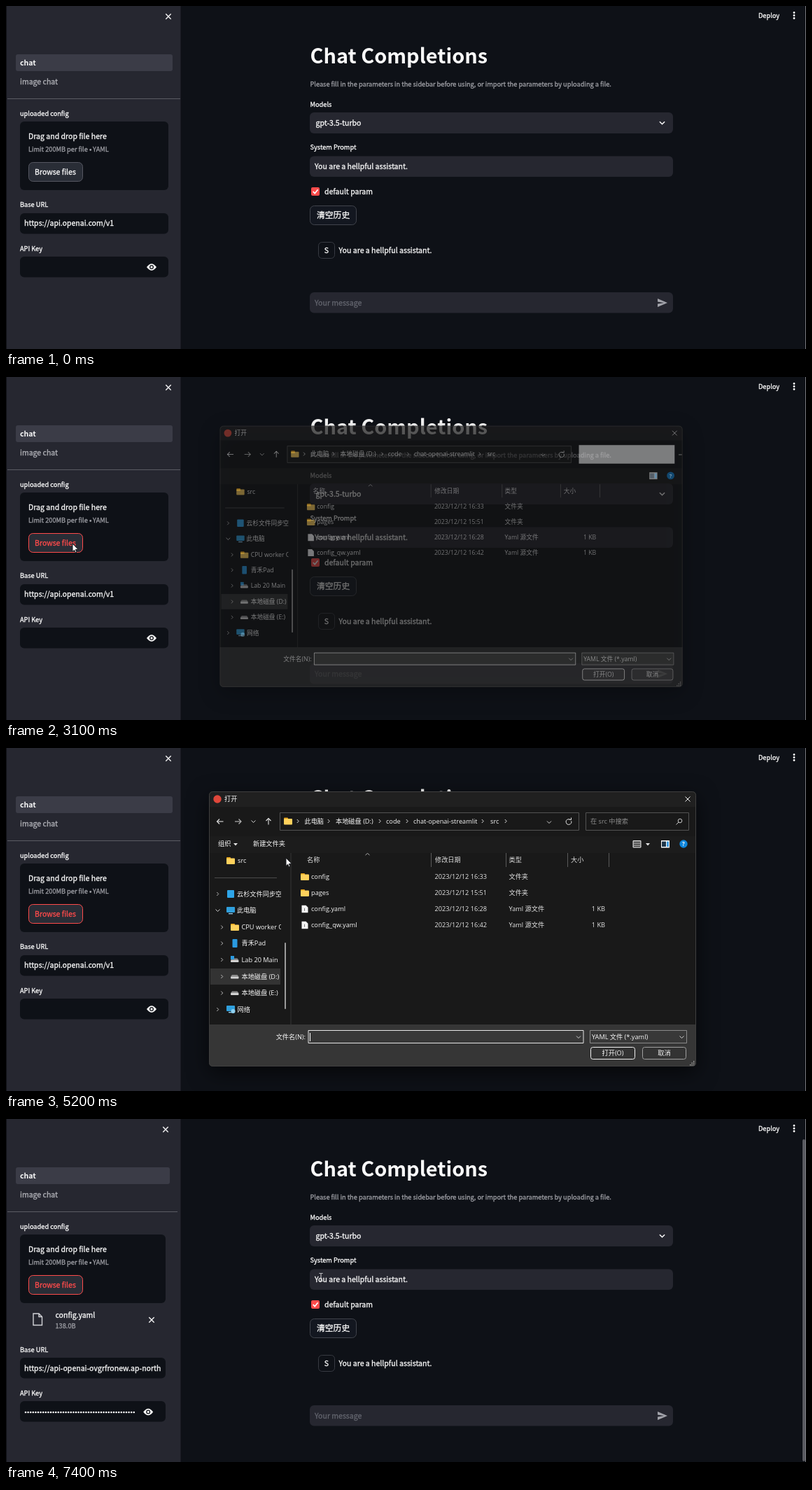
Recreate the animation shown at these times as an HTML page with a canvas. Size 1143 by 490 pixels, loop 8 s.

```html
<!DOCTYPE html>
<html lang="en">
<head>
<meta charset="utf-8">
<title>Chat Completions</title>
<style>
  html, body { margin: 0; width: 100%; height: 100%; overflow: hidden; background: #0e1117; }
  canvas { display: block; }
</style>
</head>
<body>
<canvas id="stage" width="1143" height="490"></canvas>
<script>
const ctx = document.getElementById('stage').getContext('2d');
const LOOP = 8000, STEP = 100;
const WEB = '"Noto Sans CJK SC", "Noto Sans CJK", sans-serif';
const UI = '"Open Sans", "Noto Sans CJK SC", "Noto Sans CJK", sans-serif';
const BODY = 10.54, SMALL = 9.22, DIALOG = 9.2;
const DARK = '#0e1117', PANEL = '#262730', WHITE = '#fafafa', RED = '#ff4b4b', FADED = '#9d9ea4';

// ---- drawing helpers ----
function label(str, x, y, { size = BODY, color = WHITE, font = WEB, weight = 400, align = 'left' } = {}) {
  const baseline = Math.round(y + size * 0.36);
  ctx.font = `${weight} ${size}px ${font}`;
  ctx.fillStyle = ctx.strokeStyle = color;
  ctx.textAlign = align;
  ctx.fillText(str, x, baseline);
  if (font === WEB && weight === 400) { // slightly heavier regular weight
    ctx.lineWidth = 0.3;
    ctx.strokeText(str, x, baseline);
  }
}
const small = (str, x, y, color = WHITE) => label(str, x, y, { size: SMALL, color });
const ui = (str, x, y, color = '#f8f8f8', align = 'left') =>
  label(str, x, y, { size: DIALOG, font: UI, color, align });

function box(x, y, w, h, r, fill, stroke) {
  const inset = stroke ? 0.5 : 0;
  ctx.beginPath();
  ctx.roundRect(x + inset, y + inset, w - 2 * inset, h - 2 * inset, r);
  if (fill) { ctx.fillStyle = fill; ctx.fill(); }
  if (stroke) { ctx.strokeStyle = stroke; ctx.lineWidth = 1; ctx.stroke(); }
}
function disc(x, y, r, color) {
  ctx.beginPath();
  ctx.arc(x, y, r, 0, Math.PI * 2);
  ctx.fillStyle = color;
  ctx.fill();
}
function line(color, width, ...points) {
  ctx.beginPath();
  for (let i = 0; i < points.length; i += 2) ctx.lineTo(points[i], points[i + 1]);
  ctx.strokeStyle = color;
  ctx.lineWidth = width;
  ctx.stroke();
}
function shape(x, y, path, fill, stroke, width = 1) {
  const p = new Path2D(path);
  ctx.save();
  ctx.translate(x, y);
  if (fill) { ctx.fillStyle = fill; ctx.fill(p); }
  if (stroke) { ctx.strokeStyle = stroke; ctx.lineWidth = width; ctx.stroke(p); }
  ctx.restore();
}
function clipped(x, y, w, h, draw) {
  ctx.save();
  ctx.beginPath();
  ctx.rect(x, y, w, h);
  ctx.clip();
  draw();
  ctx.restore();
}
function cross(x, y, s, color = WHITE, width = 1.3) {
  line(color, width, x - s, y - s, x + s, y + s);
  line(color, width, x - s, y + s, x + s, y - s);
}
const down = (x, y, s = 3, color = '#d0d0d0', w = 1) => line(color, w, x - s, y - s / 2, x, y + s / 2, x + s, y - s / 2);
const right = (x, y, s = 2.5, color = '#b8b8b8') => line(color, 1, x - s / 2, y - s, x + s / 2, y, x - s / 2, y + s);

function folder(x, y) {
  box(x, y - 5, 6, 4, 1, '#e8a317');
  box(x, y - 3.5, 12, 8.5, 1, '#ffd15c');
}
function eye(x, y) {
  shape(x, y, 'M-7 0Q0 -9.5 7 0Q0 9.5 -7 0Z', WHITE);
  disc(x, y, 3, DARK);
  disc(x, y, 1.7, WHITE);
}

// ---- web page ----
function sidebar(time) {
  const loaded = time >= 6500;
  const trim = loaded ? 4 : 0;
  const drop = loaded ? 45.5 : 0;
  const edge = 232 - trim;

  box(1, 0, 248.5, 490, 0, PANEL);
  cross(edge, 15, 3.7);
  box(14, 69, 224 - trim, 24, 3, '#3b3c47');
  label('chat', 20, 81.5, { weight: 700 });
  label('image chat', 20, 108, { color: '#b1b2b8' });
  box(2, 132, 247 - trim, 1, 0, '#5b5c64');

  small('uploaded config', 20, 154);
  box(20, 165, edge - 20, 98, 6, DARK);
  label('Drag and drop file here', 32, 186);
  small('Limit 200MB per file', 32, 205, FADED);
  disc(120.7, 205.5, 1.4, FADED);
  small('YAML', 124, 205, FADED);

  const hover = time >= 1500, pressed = time === 2800;
  box(32, 223, 78, 28, 6, pressed ? RED : '#292d36', hover ? RED : '#555761');
  label('Browse files', 41, 237, { color: hover && !pressed ? RED : WHITE });

  if (loaded) {
    shape(45, 286, 'M-6 -8H2L6.5 -3.5V8.5H-6ZM2 -8V-3.5H6.5', null, '#d2d3d7', 1.4);
    label('config.yaml', 70.5, 280);
    small('138.0B', 70.5, 296, FADED);
    cross(208, 287, 3.7);
  }

  small('Base URL', 20, 284 + drop);
  box(20, Math.floor(296 + drop), edge - 20, 29.5, 6, DARK);
  const url = time >= 6600 ? 'https://api-openai-ovgrfronew.ap-northeast' : 'https://api.openai.com/v1';
  clipped(26, 290, edge - 32.5, 90, () => label(url, 26, 310.5 + drop));

  small('API Key', 20, 346.5 + drop);
  box(20, Math.floor(358 + drop), edge - 20, 29.5, 6, DARK);
  if (time >= 6600) for (let i = 0; i < 44; i++) disc(28 + i * 3.6, 419, 1.3, WHITE);
  eye(208 - trim * 1.2, 373 + drop);
}

function page() {
  box(0, 0, 1143, 490, 0, DARK);
  small('Deploy', 1075, 14);
  for (const y of [9.5, 13.5, 17.5]) disc(1126, y, 1.4, WHITE);

  label('Chat Completions', 434.5, 72, { size: 28.9, weight: 700 });
  small('Please fill in the parameters in the sidebar before using, or import the parameters by uploading a file.', 434.5, 111.5, FADED);

  small('Models', 434.5, 140.5);
  box(434, 152, 519, 30, 6, PANEL);
  label('gpt-3.5-turbo', 442.5, 167);
  down(937.5, 167, 3.6, WHITE, 1.5);

  small('System Prompt', 434.5, 202);
  box(434, 214.5, 519, 29.5, 6, PANEL);
  label('You are a hellpful assistant.', 441, 229.5);

  box(436, 259, 12, 12, 2, RED);
  line('#fff', 1.7, 438.7, 265, 441.2, 267.7, 445.6, 262.3);
  label('default param', 455, 265.5);

  box(434, 285, 67, 28, 6, '#131720', '#41444c');
  label('清空历史', 444, 299, { size: 11.8 });

  box(446, 337, 24, 24, 5, DARK, '#373a42');
  label('S', 458, 349, { align: 'center' });
  label('You are a hellpful assistant.', 475.5, 349);

  box(434, 409, 519, 29.5, 6, PANEL);
  label('Your message', 441, 424, { color: '#63656e' });
  shape(931, 418, 'M0 0L14 6L0 12V7.4L9 6L0 4.6Z', '#a2a3aa');
}

// ---- file dialog ----
const FILES = [
  ['config', '16:33'], ['pages', '15:51'], ['config.yaml', '16:28'], ['config_qw.yaml', '16:42'],
];
const rowY = i => 184 + i * 22.9;

function addressBar(ready) {
  const light = '#e4e4e4';
  line(light, 1.1, 310.5, 105, 301.5, 105);
  line(light, 1.1, 305, 101.5, 301.5, 105, 305, 108.5);
  line('#bdbdbd', 1.1, 327, 105, 336, 105);
  line('#bdbdbd', 1.1, 332.5, 101.5, 336, 105, 332.5, 108.5);
  down(353.5, 105);
  line(light, 1.1, 375, 109.5, 375, 100.5);
  line(light, 1.1, 371.5, 104, 375, 100.5, 378.5, 104);

  box(391, 92, 428, 26, 0, '#191919', '#535353');
  folder(397, 104.5);
  for (const x of [417, 461, 534, 573, 681]) right(x, 104.5, 2.5, '#e0e0e0');
  [['此电脑', 426.5], ['本地磁盘 (D:)', 471], ['code', 543], ['chat-openai-streamlit', 582], ['src', 692]]
    .forEach(([str, x]) => ui(str, x, 104.5));
  down(776, 106, 3);
  ctx.beginPath();
  ctx.arc(804, 105.5, 3.8, -0.3, 5.2);
  ctx.strokeStyle = light;
  ctx.stroke();
  line(light, 1, 804.5, 102, 807.5, 102.5, 807.5, 99.5);

  if (ready) {
    right(714, 104.5, 2.5, '#e0e0e0');
    box(828, 92, 148, 26, 0, '#191919', '#535353');
    ui('在 src 中搜索', 835, 104.5, '#8d8d8d');
    ctx.beginPath();
    ctx.arc(963, 104, 2.8, 0, 7);
    ctx.strokeStyle = '#c8c8c8';
    ctx.stroke();
    line('#c8c8c8', 1, 961, 106, 957.5, 109.5);

    ui('组织', 303, 137);
    shape(325, 136, 'M0 0H6L3 3.5Z', light);
    ui('新建文件夹', 353, 137);
    box(895.5, 132, 12, 10.5, 0, '#8c8c8c', '#dcdcdc');
    for (const y of [134.5, 137.5, 140.5]) line('#333', 1, 897, y, 906, y);
    shape(914, 136, 'M0 0H6L3 3.5Z', light);
  } else {
    box(830, 91, 144, 28, 0, '#fff');
    line(light, 1, 980, 105.5, 985, 105.5);
  }
  box(936, 132, 12, 10.5, 0, '#fff');
  box(937, 133.5, 6, 7.5, 0, '#20374a');
  box(944, 133.5, 3, 7.5, 0, '#3c9be0');
  disc(968, 137, 5.7, '#0f86dc');
  label('?', 968, 137, { size: 8, weight: 700, font: UI, align: 'center' });
}

function drive(x, y) {
  shape(x, y, 'M2 -2.5H9.5L11.5 0H0Z', '#8c8c8c');
  box(x, y, 11.5, 3, 1, '#d4d4d4');
}
function monitor(x, y, color) {
  box(x, y - 5, 12, 8, 1, color);
  box(x + 3, y + 4, 6, 1.3, 0, '#9ad3f5');
}

function placesTree() {
  folder(315, 161);
  ui('src', 331, 161);
  box(298, 185, 89, 1, 0, '#4a4a4a');
  right(302.5, 208.5);
  box(316, 203, 10, 11, 1, '#2ea5e8');
  down(302.5, 232);
  monitor(315, 232, '#2f9fdc');
  ui('此电脑', 330, 232);

  box(292, 315, 100, 23, 0, '#333333');
  [256, 279, 302.5, 326.5, 350].forEach(y => right(308.5, y));
  folder(321, 256);
  box(323.5, 273, 7, 12, 1, '#2a9ae0');
  drive(321, 303);
  box(321, 297, 5, 5, 0, '#2a9ae0');
  drive(321, 326.5);
  drive(321, 350);
  clipped(330, 190, 63, 200, () => {
    ui('云杉文件同步空', 330, 208.5);
    ui('CPU worker Q', 336.5, 256);
    ui('青禾Pad', 336.5, 279);
    ui('Lab 20 Main', 336.5, 302.5);
    ui('本地磁盘 (D:)', 336.5, 326.5);
    ui('本地磁盘 (E:)', 336.5, 350);
    ui('网络', 330.5, 373.5);
  });
  right(302.5, 373.5);
  monitor(315, 373, '#2f9fdc');
  disc(324.5, 376, 3, '#8fd0f0');
  box(398, 278, 2, 95, 1, '#9b9b9b');
  box(406.5, 150, 1, 245, 0, '#363636');
}

function fileList(time, pointer) {
  [['名称', 430], ['修改日期', 613], ['类型', 718.5], ['大小', 807]].forEach(([str, x]) => ui(str, x, 160, '#dcdcdc'));
  for (const x of [607, 714, 802, 861]) box(x, 150, 1, 20, 0, '#5a5a5a');
  line('#b0b0b0', 1, 513.5, 153, 516.5, 150.5, 519.5, 153);

  const selected = time >= 5800 ? 2 : -1;
  FILES.forEach(([name, clock], i) => {
    const y = rowY(i), isFile = i > 1;
    const hovered = pointer && pointer.x > 419 && pointer.x < 858 && Math.abs(pointer.y - y) < 10;
    if (i === selected) box(419, 220, 439, 19, 0, '#777777');
    else if (hovered) box(419, Math.round(y - 10), 439, 19, 0, '#4d4d4d');
    if (isFile) {
      shape(422.5, y - 5, 'M0 0H6L9 3V10.5H0Z', '#f5f5f5');
      line('#777', 1, 426.5, y - 1, 426.5, y + 3);
    } else folder(421, y);
    ui(name, 436, y);
    ui('2023/12/12 ' + clock, 612.5, y, '#e4e4e4');
    ui(isFile ? 'Yaml 源文件' : '文件夹', 718.5, y, '#e4e4e4');
    if (isFile) ui('1 KB', 856, y, '#e4e4e4', 'right');
  });
}

function dialogFooter(time) {
  const named = time >= 5900;
  ui('文件名(N):', 428, 412.5, '#f8f8f8', 'right');
  box(431.5, 403, 394, 19, 0, '#383838', named ? '#8a8a8a' : '#e6e6e6');
  if (named) ui('config.yaml', 435, 412.5);
  else if (Math.floor((time - 3200) / 500) % 2 === 0) box(434, 407, 1, 12, 0, '#fff');
  down(818, 413, 3);
  box(834, 403, 139, 19, 0, '#383838', '#8a8a8a');
  ui('YAML 文件 (*.yaml)', 837, 412.5);
  down(965.5, 413, 3);
  box(835, 427, 64, 18, 3, '#333', '#f0f0f0');
  ui('打开(O)', 867, 435.5, '#f8f8f8', 'center');
  box(909, 427, 63, 18, 3, '#333', '#a0a0a0');
  ui('取消', 940.5, 435.5, '#f8f8f8', 'center');
  for (let i = 0; i < 3; i++)
    for (let j = 0; j <= i; j++) box(982 - j * 2.5, 447 + i * 2.5, 1.4, 1.4, 0, '#aaa');
}

function dialogPose(time) {
  if (time < 3100 || time > 6300) return null;
  if (time === 3100) return { scale: 0.95, alpha: 0.45 };
  if (time === 3200) return { scale: 0.986, alpha: 1 };
  if (time === 3300) return { scale: 0.997, alpha: 1 };
  if (time === 6300) return { scale: 0.96, alpha: 0.4 };
  return { scale: 1, alpha: 1 };
}

function dialog(time, pointer) {
  const pose = dialogPose(time);
  if (!pose) return;
  ctx.save();
  ctx.globalAlpha = pose.alpha;
  ctx.translate(600, 215);
  ctx.scale(pose.scale, pose.scale);
  ctx.translate(-600, -215);

  ctx.save();
  ctx.shadowColor = 'rgba(0,0,0,.6)';
  ctx.shadowBlur = 30;
  ctx.shadowOffsetY = 9;
  box(290, 62, 696, 393, 5, '#191919');
  ctx.restore();
  box(290, 62, 696, 22, [5, 5, 0, 0], '#202020');
  box(290, 126, 696, 24, 0, '#1c1c1c');
  box(290, 395, 696, 60, [0, 0, 5, 5], '#363636');

  disc(302, 73, 5.7, '#e0473a');
  ui('打开', 312, 73);
  cross(974, 73, 3.5, '#f0f0f0', 1);
  addressBar(time >= 3300);
  placesTree();
  fileList(time, pointer);
  dialogFooter(time);
  box(290, 62, 696, 393, 5, null, '#3f3f3f');
  ctx.restore();
}

// ---- pointer ----
const PATH = [
  [300, 1125, 400], [500, 866, 300], [700, 866, 300], [1000, 600, 268], [1300, 245, 246],
  [1600, 95, 238], [3900, 95, 238], [4200, 125, 238], [4800, 262, 236],
  [5000, 330, 190], [5200, 400, 157], [5400, 437, 176], [5700, 449, 226], [8000, 449, 226],
];
function pointerAt(time) {
  if (time < 300 || (time >= 6300 && time < 7400)) return null;
  const i = PATH.findIndex(key => key[0] >= time);
  const [t1, x1, y1] = PATH[i], [t0, x0, y0] = PATH[Math.max(0, i - 1)];
  const k = t1 === t0 ? 1 : (time - t0) / (t1 - t0);
  const kind = time >= 7400 ? 'beam' : time >= 1500 && time < 3000 ? 'hand' : 'arrow';
  return { x: x0 + (x1 - x0) * k, y: y0 + (y1 - y0) * k, kind };
}
const POINTERS = {
  arrow: 'M0 0V11.5L2.6 9.2L4.3 13L6 12.2L4.4 8.5L8 8.3Z',
  hand: 'M-1.3 1Q0 -.8 1.3 1V5Q3 4.5 3.6 5.5Q5 5 5.6 6Q7 5.8 7.3 7.2V11Q6.8 13.5 5.8 15H-.8Q-2.5 11.5 -4 9Q-3.8 7.5 -1.3 9Z',
};
function drawPointer({ x, y, kind }) {
  if (kind === 'beam') shape(450, 226, 'M-2.5 -5.5H-.5L0 -5L.5 -5.5H2.5M0 -5V5M-2.5 5.5H-.5L0 5L.5 5.5H2.5', null, '#d5d5d8');
  else shape(x, y, POINTERS[kind], '#fff', '#16181c');
}

// ---- timeline ----
function render(now) {
  const time = Math.floor((now % LOOP) / STEP) * STEP;
  const pointer = pointerAt(time);
  page();
  const overMain = (time >= 300 && time < 1300) || time >= 6400;
  if (overMain) box(1138, 29, 4, 460, 2, '#5a5b61');
  sidebar(time);
  box(0, 0, 1, 490, 0, '#111217');
  box(1142, 0, 1, 490, 0, '#77787c');
  dialog(time, pointer);
  if (pointer) drawPointer(pointer);
}
const start = performance.now();
function tick() {
  render(performance.now() - start);
  requestAnimationFrame(tick);
}
tick();
</script>
</body>
</html>
```
